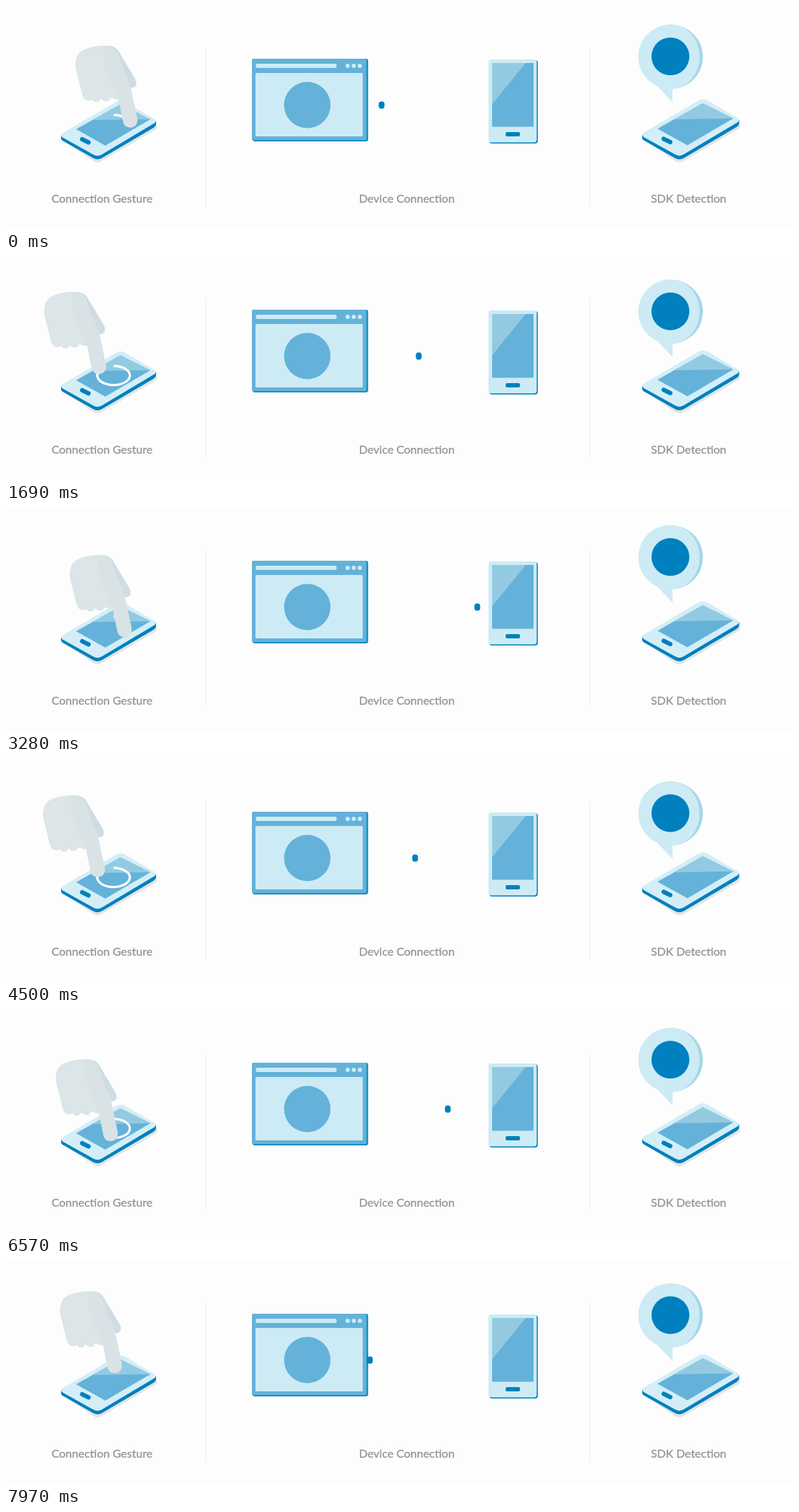
These frames come from a looping animation (1101x313 px, 8 s). An HTML page:

```html
<!DOCTYPE html>
<html lang="en">
<head>
<meta charset="utf-8">
<title>Connection steps</title>
<style>
  html, body { margin: 0; width: 100%; height: 100%; overflow: hidden; background: #fdfdfd; }
  svg { display: block; width: 1101px; height: 313px; }
  .pale { fill: #cdebf5; }
  .mid { fill: #64b2d9; }
  .deep { fill: #0080bf; }
  .shine { fill: #93cae2; }
  text {
    font: 16px Lato, sans-serif; text-anchor: middle;
    fill: #949494; stroke: #949494; stroke-width: .3px;
  }
</style>
</head>
<body>
<svg viewBox="0 0 1101 313">
  <defs>
    <g id="device">
      <path fill="#e4e4e4" d="M79 188L122 217.500Q128 221.500 134 217.500L210 173Q213 170 210 166Z"/>
      <path class="deep" d="M77 181V185Q77 188 80 189.500L122 213.500Q128 217 134 213.500L207 170.500Q210 168.500 210 166V161Z"/>
      <path fill="#d3eef7" d="M80 178L154 134.500Q160 131 166 134L207.500 158.500Q212 161.500 207.500 164.500L134 208.500Q128 212 122 208.500L80 185Q74 181.500 80 178Z"/>
      <path class="mid" d="M98 173L160 138L202 159L139 196Z"/>
      <path class="shine" d="M121 160L160 138L202 159Z"/>
      <path d="M106.500 187L115.500 191.500" stroke="#0080bf" stroke-width="6" stroke-linecap="round"/>
    </g>
  </defs>

  <path d="M279.500 60V280M816.500 60V280" stroke="#ebebeb"/>
  <text x="134.300" y="276">Connection Gesture</text>
  <text x="560.700" y="276">Device Connection</text>
  <text x="955" y="276">SDK Detection</text>

  <use href="#device"/>
  <path id="trail" fill="none" stroke="#fff" stroke-width="3.200"/>
  <g id="hand">
    <path fill="#cedde3" d="M140 56Q154 55 159 66L181 103Q185 112 178 115L165 114Z"/>
    <path fill="#dce5e8" d="M97 84Q97 69 106 63Q122 55 140 56Q152 57 156 67L160 130Q157 133 152 131L146 129Q145 134 140 134Q135 134 133 130Q131 135 126 135Q122 135 121 131Q119 134 114 133Q109 132 107 126L98 90Z"/>
    <path fill="#d9e2e5" d="M136 56Q152 56 157 68Q162 85 169 100Q173 108 175 117L183.800 158Q185 169 175 171Q166 171 164 164L157 130L138 85Z"/>
  </g>

  <rect id="dot" class="deep" x="-4" y="134" width="8" height="10" rx="3.600"/>

  <rect class="deep" x="345" y="74" width="161.500" height="116" rx="3"/>
  <rect class="mid" x="344" y="74" width="160.500" height="114.500" rx="2"/>
  <rect class="pale" x="349.500" y="81" width="113" height="6" rx="2"/>
  <g class="pale">
    <circle cx="478" cy="84" r="3"/>
    <circle cx="486.500" cy="84" r="3"/>
    <circle cx="495" cy="84" r="3"/>
  </g>
  <rect class="pale" x="349" y="94" width="150" height="89" rx="1.500"/>
  <circle class="mid" cx="421.500" cy="139" r="32.500"/>

  <rect class="deep" x="676" y="76" width="68" height="117" rx="4"/>
  <rect class="pale" x="675" y="75" width="67.500" height="116.500" rx="4"/>
  <rect class="mid" x="680" y="80" width="58" height="89.500"/>
  <path class="shine" d="M680 80H727L680 138Z"/>
  <rect class="deep" x="699" y="177" width="20" height="6" rx="2"/>

  <use href="#device" transform="translate(890 216) scale(1.02) translate(-77 -216)"/>
  <g id="bubble">
    <circle fill="#a5d7e7" cx="930" cy="71" r="45"/>
    <path class="pale" d="M930 26A45 45 0 0 0 911 112L932.500 135V116A39 45 0 0 0 930 26Z"/>
    <circle class="deep" cx="929.500" cy="70.500" r="26.500"/>
  </g>
</svg>
<script>
  const LOOP = 8000, TAU = 2 * Math.PI;
  const el = id => document.getElementById(id);
  const [trail, hand, dot, bubble] = ['trail', 'hand', 'dot', 'bubble'].map(el);
  const move = (node, x, y) => node.setAttribute('transform', `translate(${x.toFixed(2)} ${y.toFixed(2)})`);

  // Finger circles clockwise; the trail runs from the top to the fingertip.
  function drawHand(t) {
    const turn = ((89 + 0.1249 * t) % 360) / 360 * TAU;
    const sin = Math.sin(turn), cos = Math.cos(turn);
    move(hand, 23.5 * (sin - 1), -13.5 * cos);
    const x = 150.5 + 22.8 * sin, y = 166.3 - 13.4 * cos;
    trail.setAttribute('d', `M150.5 152.9A22.8 13.4 0 ${turn > Math.PI ? 1 : 0} 1 ${x.toFixed(2)} ${y.toFixed(2)}`);
  }

  // Dot shuttles between the window and the phone.
  function drawDot(t) {
    const wave = (1 - Math.cos(TAU * (t - 240) / 1910)) / 2;
    move(dot, 507 + 168 * wave ** 1.15, 0);
  }

  function drawBubble(t) {
    move(bubble, 0, 2.2 - 4.1 * Math.cos(TAU * (t - 500) / 2865));
  }

  const start = performance.now();
  function tick() {
    const t = (performance.now() - start) % LOOP;
    drawHand(t);
    drawDot(t);
    drawBubble(t);
    requestAnimationFrame(tick);
  }
  tick();
</script>
</body>
</html>
```
